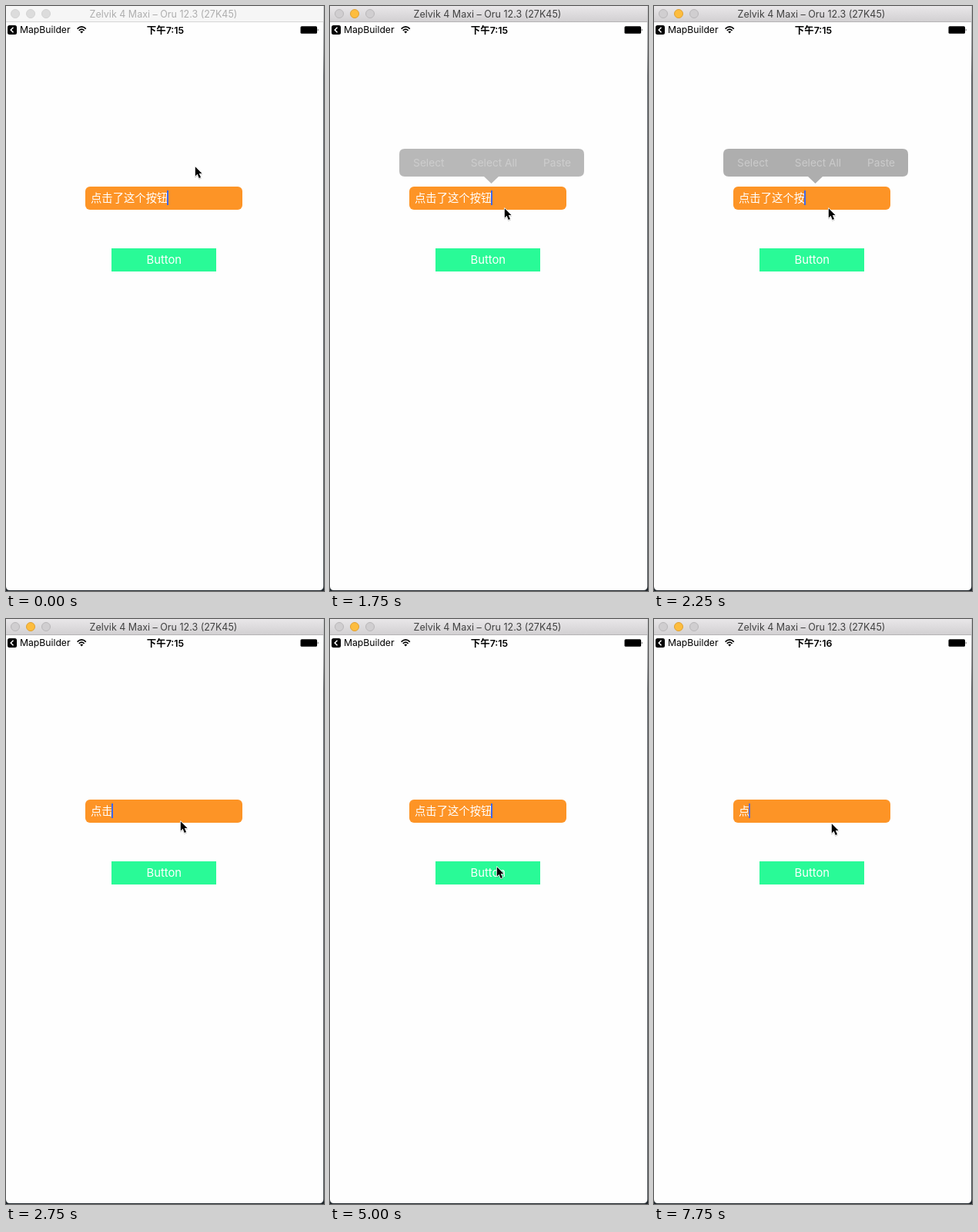
These frames come from a looping animation (413 px wide and 758 px high, 8 s). An HTML page:

```html
<!DOCTYPE html>
<html lang="zh-CN">
<head>
<meta charset="utf-8">
<title>Text field demo</title>
<style>
  html, body { margin: 0; width: 100%; height: 100%; overflow: hidden; background: #fff; }
  svg { display: block; width: 413px; height: 758px; }
  text { font-family: Inter, "Noto Sans CJK SC", "Noto Sans CJK", sans-serif; }
  .mid { text-anchor: middle; }
</style>
</head>
<body>
<svg viewBox="0 0 413 758">
  <defs>
    <linearGradient id="barFill" x2="0" y2="1">
      <stop stop-color="#e9e7e9"/><stop offset="1" stop-color="#d2d0d2"/>
    </linearGradient>
    <linearGradient id="edge" x2="0" y2="1">
      <stop stop-color="#b4b6b8"/><stop offset=".08" stop-color="#74787c"/>
      <stop offset=".12" stop-color="#343b42"/><stop offset="1" stop-color="#20272d"/>
    </linearGradient>
  </defs>

  <!-- window -->
  <rect width="413" height="758" fill="url(#edge)"/>
  <path d="M0 0H412.2V752Q412.2 757 407 757H5Q0 757 0 752Z" fill="#fefefe"/>
  <rect id="bar" width="412.2" height="20"/>
  <rect id="rule" y="20" width="412.2" height="1"/>
  <g stroke-width="1">
    <circle class="dot" cx="12" cy="10" r="5.5"/>
    <circle class="dot" cx="32" cy="10" r="5.5"/>
    <circle class="dot" cx="52" cy="10" r="5.5"/>
  </g>
  <text id="title" class="mid" x="204.5" y="15" font-size="12.5">Zelvik 4 Maxi – Oru 12.3 (27K45)</text>

  <!-- status bar -->
  <rect x="2" y="25" width="12" height="12" rx="2.5"/>
  <path d="M9.5 27.8L6.2 31L9.5 34.2" fill="none" stroke="#fff" stroke-width="1.5"/>
  <text x="18" y="35" font-size="12.2">MapBuilder</text>
  <g fill="none" stroke="#000" stroke-width="1.7">
    <path d="M92.6 29.6Q98.2 24.2 103.8 29.6"/>
    <path d="M94.8 31.8Q98.2 28.6 101.6 31.8"/>
  </g>
  <path d="M96.2 33.2Q98.2 31.6 100.2 33.2L98.2 35.4Z"/>
  <text id="clock" class="mid" x="207" y="35.5" font-size="12.4" font-weight="600"></text>
  <rect x="382.5" y="26.2" width="21.5" height="9.6" rx="1.5"/>
  <path d="M404.8 29.2Q406.5 31 404.8 32.8Z"/>

  <!-- field and button -->
  <rect x="103" y="234" width="204" height="30" rx="6" fill="#fd9426"/>
  <text id="field" x="110" y="253.8" font-size="14.33" font-weight="300" fill="#fff"></text>
  <rect id="caret" y="239" width="2" height="19" fill="#3f66ea"/>
  <rect x="137" y="314" width="136" height="30" fill="#29fa97"/>
  <text id="label" class="mid" x="205.3" y="334.3" font-size="14.8" fill="#fff">Button</text>

  <!-- edit menu -->
  <g id="menu">
    <path id="bubble" d="M97 185H323Q330 185 330 192V214Q330 221 323 221H219L209.5 230L200 221H97Q90 221 90 214V192Q90 185 97 185Z"/>
    <g id="items" class="mid" font-size="13.7">
      <text x="128.3" y="208">Select</text>
      <text x="213" y="208">Select All</text>
      <text x="295" y="208">Paste</text>
    </g>
  </g>

  <!-- pointer with a soft shadow -->
  <g id="pointer" stroke-linejoin="round">
    <path d="M.8 2.2V14.4L3.6 11.8L5.8 17L8 16.1L5.8 11H9.5Z" opacity=".2" stroke="#000" stroke-width="1.6"/>
    <path d="M.8 1.2V13.4L3.6 10.8L5.8 16L8 15.1L5.8 10H9.5Z" stroke="#fff" stroke-width="1.6" paint-order="stroke"/>
  </g>
</svg>
<script>
  const LOOP = 8000;
  const PHRASE = "点击了这个按钮";
  const GLYPH = 14.33;
  const MENUS = { soft: ["#b8b8b8", "#cdcdcd"], dark: ["#222222", "#ffffff"], fading: ["#aeaeae", "#cacaca"] };

  // Each step holds only what changes; everything switches hard.
  const steps = [
    [0, { at: [245, 207], chars: 7, caret: 1, active: false, pressed: false, menu: null, minute: 15 }],
    [250, { at: [234, 244] }],
    [500, { at: [175, 318] }],
    [750, { pressed: true }],
    [1000, { at: [198, 302], pressed: false }],
    [1250, { at: [226, 261], caret: .65 }],
    [1500, { active: true, caret: 1 }],
    [1750, { menu: "soft" }],
    [2000, { menu: "dark" }],
    [2250, { menu: "fading", chars: 6 }],
    [2500, { menu: null, chars: 4 }],
    [2750, { chars: 2 }],
    [3000, { chars: 1 }],
    [3750, { chars: 0, caret: .9 }],
    [4250, { at: [223, 284] }],
    [4500, { at: [216, 320] }],
    [4750, { pressed: true }],
    [5000, { pressed: false, chars: 7, caret: 1 }],
    [5500, { pressed: true, caret: .65 }],
    [5750, { pressed: false, caret: 1 }],
    [6250, { at: [232, 270] }],
    [6500, { at: [230, 264] }],
    [7000, { chars: 6, minute: 16 }],
    [7250, { chars: 4 }],
    [7500, { chars: 2 }],
    [7750, { chars: 1, caret: .8 }]
  ];

  const el = id => document.getElementById(id);
  const dots = document.querySelectorAll(".dot");

  function stateAt(time) {
    const past = steps.filter(([start]) => start <= time);
    return Object.assign({}, ...past.map(([, change]) => change));
  }

  function paintWindow(active) {
    el("bar").setAttribute("fill", active ? "url(#barFill)" : "#f6f6f6");
    el("rule").setAttribute("fill", active ? "#b5b3b5" : "#d6d6d6");
    el("title").setAttribute("fill", active ? "#404040" : "#aeaeae");
    dots.forEach((dot, i) => {
      const lit = active && i === 1;
      dot.setAttribute("fill", lit ? "#fdbd3e" : active ? "#d0ced0" : "#dcdcdc");
      dot.setAttribute("stroke", lit ? "#dfa033" : active ? "#b9b7b9" : "#d2d2d2");
    });
  }

  // The caret sits just before the next glyph but never left of the text area.
  const caretX = chars => Math.max(110, Math.round(108.7 + chars * GLYPH));

  function render(time) {
    const s = stateAt(time);
    paintWindow(s.active);
    el("clock").textContent = "下午7:" + s.minute;
    el("field").textContent = PHRASE.slice(0, s.chars);
    el("caret").setAttribute("x", caretX(s.chars));
    el("caret").setAttribute("opacity", s.caret);
    el("label").setAttribute("opacity", s.pressed ? .3 : 1);
    el("pointer").setAttribute("transform", `translate(${s.at})`);
    el("menu").setAttribute("visibility", s.menu ? "visible" : "hidden");
    if (s.menu) {
      const [back, ink] = MENUS[s.menu];
      el("bubble").setAttribute("fill", back);
      el("items").setAttribute("fill", ink);
    }
  }

  const start = performance.now();
  function tick() {
    render((performance.now() - start) % LOOP);
    requestAnimationFrame(tick);
  }
  tick();
</script>
</body>
</html>
```
